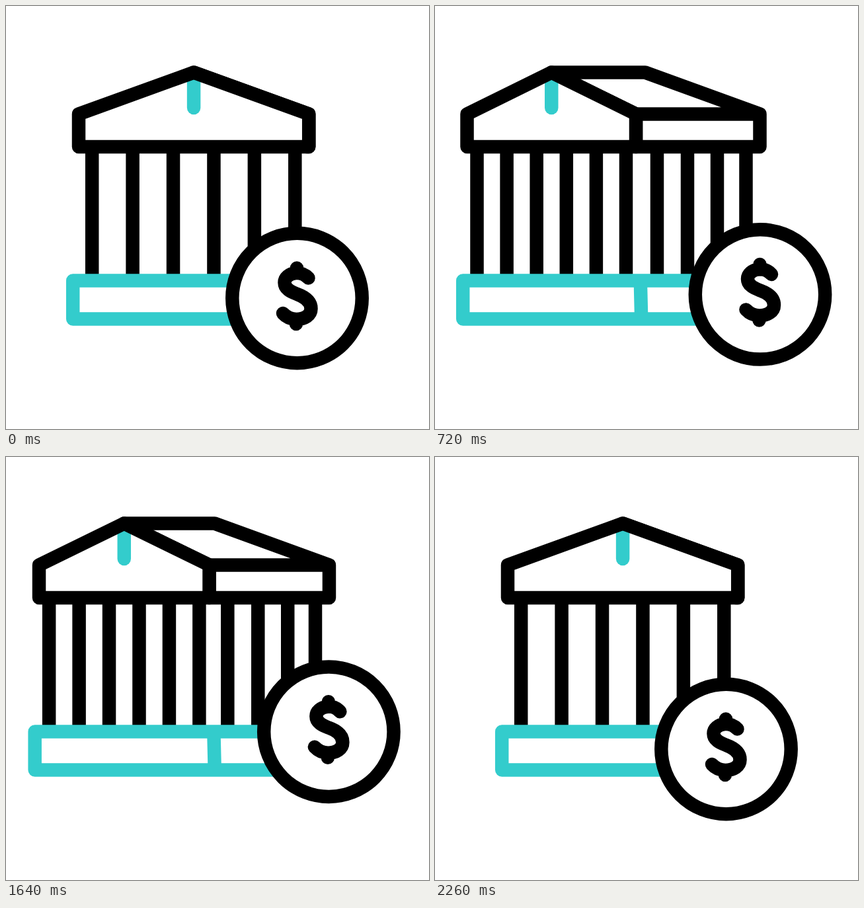
Recreate the animation shown at these times as an HTML page. Size 640x640 px, loop 2400 ms.

```html
<!DOCTYPE html>
<html lang="en">
<head>
<meta charset="utf-8">
<title>Bank</title>
<style>
  html, body { margin: 0; width: 100%; height: 100%; overflow: hidden; background: #fff; }
  svg { display: block; width: 100%; height: 100%; }
  path, circle { fill: none; stroke: #000; stroke-width: 20.5; stroke-linecap: round; stroke-linejoin: round; }
  .fill { fill: #fff; }
  .bare { fill: #fff; stroke: none; }
  .flat { stroke-linecap: butt; }
  .teal { stroke: #33cccc; }
</style>
</head>
<body>
<svg viewBox="0 0 640 640">
  <path id="sideCols" class="flat"/>
  <path id="wall" class="bare"/>
  <path id="frontCols" class="flat"/>
  <path id="sideRoof" class="fill"/>
  <path id="gable" class="bare"/>
  <path id="tick" class="teal"/>
  <path id="frontRoof"/>
  <path id="base" class="teal fill"/>
  <path id="sparks" class="teal"/>
  <g id="coin">
    <circle class="fill" r="98.2"/>
    <path d="M17 -30.5C11 -37 4 -38.5 -2 -38C-12 -37 -19 -31 -19 -23.5C-19 -14 -10 -10 0 -6C11 -2 21 4 21 16C21 26 11 32 -1 32C-9 32 -16 29 -21.5 23M-.5 -45.5V-38M-1.5 39V32"/>
  </g>
</svg>
<script>
const LOOP = 2400, STEP = 20;
const TOP = 100.5, EAVE = 163.5, BEAM = 213, FLOOR = 415.5, GROUND = 473.5;
const el = Object.fromEntries([...document.querySelectorAll('[id]')].map(e => [e.id, e]));

const lerp = (a, b, p) => a + (b - a) * p;
const ramp = (t, a, b) => Math.min(1, Math.max(0, (t - a) / (b - a)));
const smooth = u => u * u * (3 - 2 * u);
const ease = (t, a, b) => smooth(ramp(t, a, b));
// goes to 1 and later back to 0
const swing = (t, a, b, c, d) => ease(t, a, b) - ease(t, c, d);
const draw = (name, d) => el[name].setAttribute('d', d);
const column = x => `M${x} ${BEAM}V${FLOOR}`;

function building(t) {
  const p = swing(t, 200, 560, 1580, 2246);
  const pLeft = Math.pow(p, 1.08);
  const pSide = swing(t, 200, 570, 1520, 2260);

  const left = lerp(110, 48.5, pLeft), right = lerp(458.2, 304, p);
  const apex = (left + right) / 2;
  const backApex = lerp(284, 318, pSide), back = lerp(455.5, 491.5, pSide);

  draw('sideRoof', `M${apex} ${TOP}H${backApex}L${back} ${EAVE}V${BEAM}H${right}V${EAVE}ZM${right} ${EAVE}H${back}`);
  const front = `M${left} ${EAVE}L${apex} ${TOP}L${right} ${EAVE}V${BEAM}H${left}Z`;
  draw('gable', front);
  draw('frontRoof', front);
  draw('tick', `M${apex} ${TOP + 8}V154`);

  const first = lerp(130.2, 63.5, pLeft), last = lerp(437.3, 289, p);
  draw('frontCols', [0, 1, 2, 3, 4, 5].map(i => column(lerp(first, last, i / 5))).join(''));
  draw('wall', `M${first} ${BEAM}H${last}V${FLOOR}H${first}Z`);
  draw('sideCols', [[307, 336], [351, 382], [394, 427]].map(([a, b]) => column(lerp(a, b, p))).join('')
    + column(lerp(435, 470.5, pSide)));

  const foot = lerp(101.2, 42.2, pLeft), edge = lerp(467, 311.5, p), end = lerp(465, 499, pSide);
  draw('base', `M${foot} ${FLOOR}H${end}V${GROUND}H${foot}ZM${edge - .7} ${FLOOR}L${edge + .7} ${GROUND}`);
}

function coin(t) {
  const p = swing(t, 200, 620, 1520, 2260);
  let hop = 0;
  if (t < 860) hop = 37.3 * Math.sin(ramp(t, 620, 860) * Math.PI / 2);
  else if (t < 1340) hop = lerp(37.3, -44, ease(t, 860, 1340));
  else hop = lerp(-44, 0, ease(t, 1340, 1520));
  el.coin.setAttribute('transform', `translate(${lerp(440.5, 492, p)} ${lerp(442, 413.7, p) + hop})`);
}

function sparks(t) {
  const head = ramp(t, 1840, 2054), tail = ramp(t, 1960, 2160);
  const ray = (x1, y1, x2, y2) => {
    const at = k => `${lerp(x1, x2, k)} ${lerp(y1, y2, k)}`;
    return `M${at(tail)}L${at(head)}`;
  };
  draw('sparks', head > tail ? ray(469, 130, 494, 70.8) + ray(485.5, 152.2, 542, 121.6) : '');
}

function frame(now) {
  const t = Math.floor(now % LOOP / STEP) * STEP;
  building(t);
  coin(t);
  sparks(t);
}

let start;
function tick(now) {
  start ??= now;
  frame(Math.max(0, now - start));
  requestAnimationFrame(tick);
}
frame(0);
requestAnimationFrame(tick);
</script>
</body>
</html>
```
